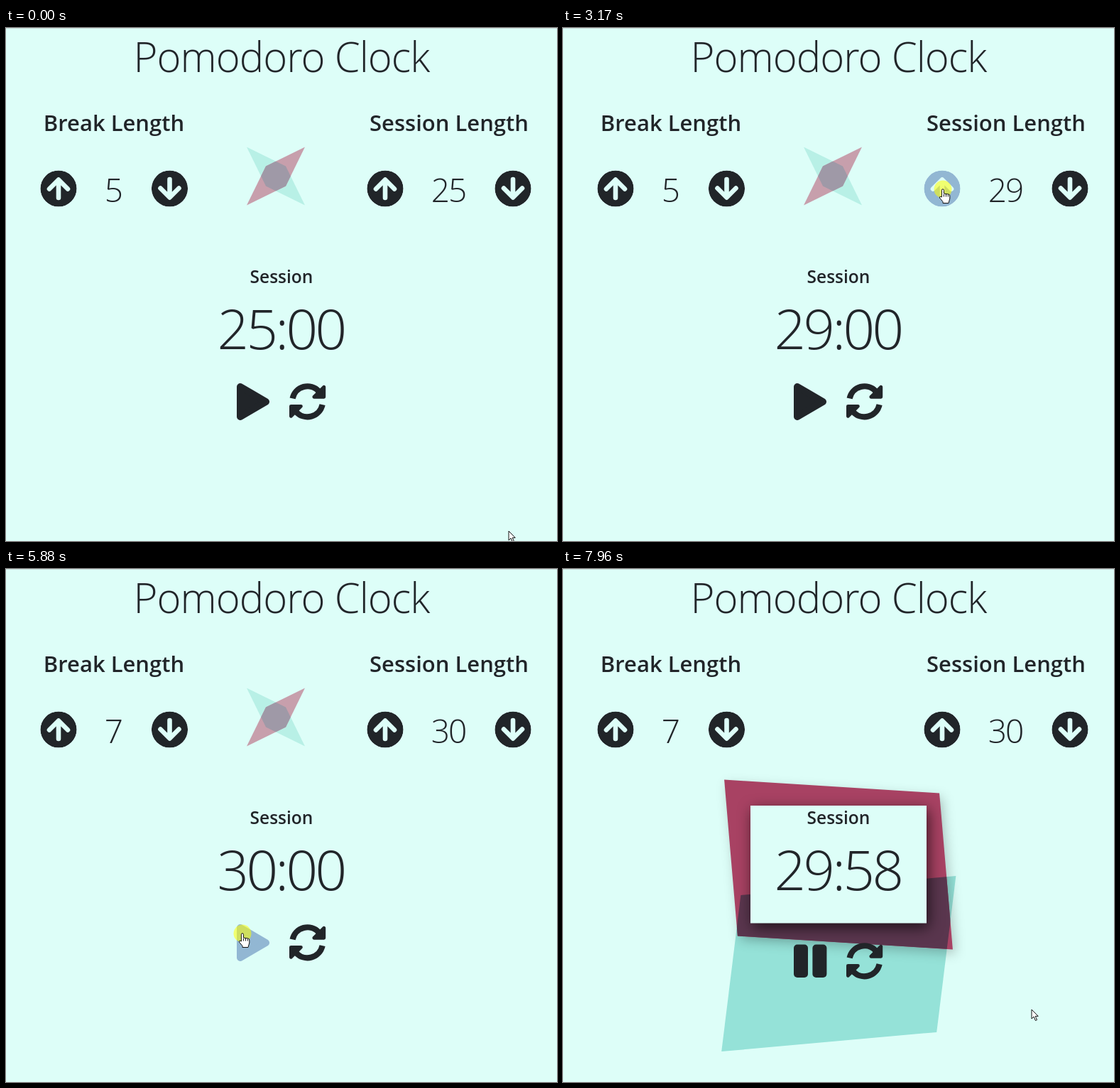
These frames come from a looping animation (776x722 px, 8000 ms). An HTML page:

```html
<!DOCTYPE html>
<html lang="en">
<head>
<meta charset="utf-8">
<title>Pomodoro Clock</title>
<style>
  html, body { margin: 0; width: 100%; height: 100%; overflow: hidden; background: #ddfef8; }
  svg { display: block; width: 776px; height: 722px; fill: #212529; }
  text { font-family: "Open Sans", "Noto Sans", sans-serif; font-weight: 300; text-anchor: middle; }
  .title { font-size: 58px; letter-spacing: -1px; }
  .head { font-size: 31px; font-weight: 600; }
  .count { font-size: 46px; letter-spacing: -2px; }
  .label { font-size: 24.5px; font-weight: 600; }
  .time { font-size: 78px; letter-spacing: -3.5px; }
  .button { color: #212529; fill: currentColor; stroke-linejoin: round; }
  .hover { color: #6c93c1; opacity: .66; }
  .idle { --red: #c79fac; --teal: #b8f0e6; --mix: #9f99a7; }
  .run { --red: #a84263; --teal: #95e2d8; --mix: #5a364e; }
  .run #redShadow { filter: drop-shadow(4px 6px 8px rgba(0, 0, 0, .22)); }
  .run #panel { filter: drop-shadow(3px 6px 10px rgba(0, 0, 0, .65)); }
  .idle #panel, .idle #pause, .run #play { display: none; }
  #arrow, #hand { fill: #fff; stroke: #111; stroke-linejoin: round; }
</style>
</head>
<body>
<svg id="stage" class="idle" viewBox="0 0 776 722">
  <defs>
    <mask id="arrowHole">
      <circle r="25.6" fill="#fff"/>
      <path d="M-13 .5L0 -12.5L13 .5M0 -12V13" fill="none" stroke="#000" stroke-width="6.6" stroke-linecap="round" stroke-linejoin="round"/>
    </mask>
    <circle id="circleArrow" r="25.6" mask="url(#arrowHole)"/>
    <g id="syncHalf" stroke="currentColor">
      <path d="M-21 -4.4A21.5 21.5 0 0 1 16 -14.4" fill="none" stroke-width="8.2"/>
      <path d="M23.2 -20.5V-6.5H9.2Z" stroke-width="4.8"/>
    </g>
    <clipPath id="tealClip"><polygon id="tealEdge"/></clipPath>
  </defs>
  <path d="M0 .5H776" stroke="#c9dedb"/>
  <text class="title" x="388" y="62">Pomodoro Clock</text>
  <text class="head" x="152" y="145">Break Length</text>
  <text class="head" x="624" y="145">Session Length</text>

  <polygon id="teal" fill="var(--teal)"/>
  <g id="redShadow"><polygon id="red" fill="var(--red)"/></g>
  <polygon id="mix" fill="var(--mix)" clip-path="url(#tealClip)"/>
  <rect id="panel" x="264" y="333" width="248" height="165.5" fill="#ddfef8"/>

  <text class="count" id="breakCount" x="151" y="245"></text>
  <text class="count" id="sessionCount" x="623" y="245"></text>
  <text class="label" x="388" y="359">Session</text>
  <text class="time" id="clock" x="387" y="452"></text>

  <g id="rounds"></g>
  <g id="controls">
    <g class="button">
      <path id="play" d="M330 505L366 526L330 547Z" stroke="currentColor" stroke-width="10"/>
      <g id="pause">
        <rect x="325" y="502.5" width="20" height="46.5" rx="5"/>
        <rect x="351.4" y="502.5" width="20" height="46.5" rx="5"/>
      </g>
    </g>
    <g class="button" transform="translate(424.6 525.8)">
      <use href="#syncHalf"/>
      <use href="#syncHalf" transform="rotate(180)"/>
    </g>
  </g>

  <g id="cursor">
    <circle id="press" r="12.5" fill="rgba(255, 255, 0, .55)"/>
    <path id="arrow" d="M0 0V13L3 10L5.4 15.5L7.5 14.6L5.2 9.4H9.2Z"/>
    <path id="hand" d="M-1.6 11V1.3a1.5 1.5 0 0 1 3 0V6L8 7Q10 7 9.8 10V13L8 19.5H0V17.5L-4.6 12Q-5 9-1.6 11ZM1.4 7v3.5M4.4 7v3.5M7.3 7.5v3"/>
  </g>
</svg>
<script>
const LOOP = 8000, START = 5950, PRESS = 80;
const $ = id => document.getElementById(id);

const roundX = [74, 230.5, 534, 714], roundY = 226;
$("rounds").innerHTML = roundX.map((x, i) =>
  `<use class="button" href="#circleArrow" transform="translate(${x} ${roundY}) rotate(${i % 2 * 180})"/>`).join("");
const buttons = [...document.querySelectorAll(".button")];

// Cursor moves: from time, to time, target x, y
const home = [708, 708];
const moves = [
  [70, 500, 430, 525], [500, 840, 567, 200], [920, 1690, 714, 228],
  [1740, 1900, 535, 227], [3270, 3600, 233, 220], [3900, 4100, 94, 226],
  [4900, 5560, 333, 513], [START, 6220, 367, 545], [6700, 7400, 677, 649],
  [7580, 7900, 660, 620]
];
const sessionPresses = [2010, 2190, 2370, 2770, 3170];
const breakPresses = [4320, 4790];
const presses = [...sessionPresses, ...breakPresses, 5880];

function ease(t, from, to) {
  const u = Math.min(1, Math.max(0, (t - from) / (to - from)));
  return u * u * (3 - 2 * u);
}

const cursorAt = t => moves.reduce(([x, y], [from, to, nx, ny]) => {
  const k = ease(t, from, to);
  return [x + (nx - x) * k, y + (ny - y) * k];
}, home);

const released = (list, t) => list.filter(p => t >= p + PRESS).length;

function hovered(x, y, shift) {
  const round = roundX.findIndex(cx => Math.hypot(x - cx, y - roundY) < 26);
  if (round >= 0) return round;
  if (Math.abs(y - 526 - shift) > 26) return -1;
  return Math.abs(x - 348) < 24 ? 4 : Math.abs(x - 424.6) < 26 ? 5 : -1;
}

// Box sheared by d pixels along both axes
const sheared = (cx, cy, d) => [[-1, -1], [1, -1], [1, 1], [-1, 1]]
  .map(([x, y]) => [cx + (303 * x + d * y) / 2, cy + (220 * y + d * x) / 2]).join(" ");

// Diamond along a diagonal; side is 1 or -1
const diamond = side => [[41, -41], [14, 14], [-41, 41], [-14, -14]]
  .map(([x, y]) => [380 + x * side, 208.5 + y]).join(" ");

function draw(t) {
  const running = t >= START, shift = running ? 26 : 0;
  const sway = 5 * Math.cos((t - 6480) / 2500 * 2 * Math.PI);
  const red = running ? sheared(388, 416, sway + 23) : diamond(1);
  const teal = running ? sheared(388.3, 555.5, sway - 23) : diamond(-1);
  for (const id of ["red", "mix"]) $(id).setAttribute("points", red);
  for (const id of ["teal", "tealEdge"]) $(id).setAttribute("points", teal);
  $("stage").setAttribute("class", running ? "run" : "idle");
  $("controls").setAttribute("transform", `translate(0 ${shift})`);

  const minutes = 25 + released(sessionPresses, t);
  const left = minutes * 60 - (running ? Math.floor((t - START) / 1000) : 0);
  $("sessionCount").textContent = minutes;
  $("breakCount").textContent = 5 + released(breakPresses, t);
  $("clock").textContent = Math.floor(left / 60) + ":" + String(left % 60).padStart(2, "0");

  const [x, y] = cursorAt(t), over = hovered(x, y, shift);
  buttons.forEach((b, i) => b.classList.toggle("hover", i === over));
  $("cursor").setAttribute("transform", `translate(${x} ${y})`);
  $("arrow").style.display = over < 0 ? "" : "none";
  $("hand").style.display = over < 0 ? "none" : "";
  $("press").style.display = presses.some(p => t >= p && t < p + PRESS) ? "" : "none";
}

function tick() {
  draw(performance.now() % LOOP);
  requestAnimationFrame(tick);
}
tick();
</script>
</body>
</html>
```
